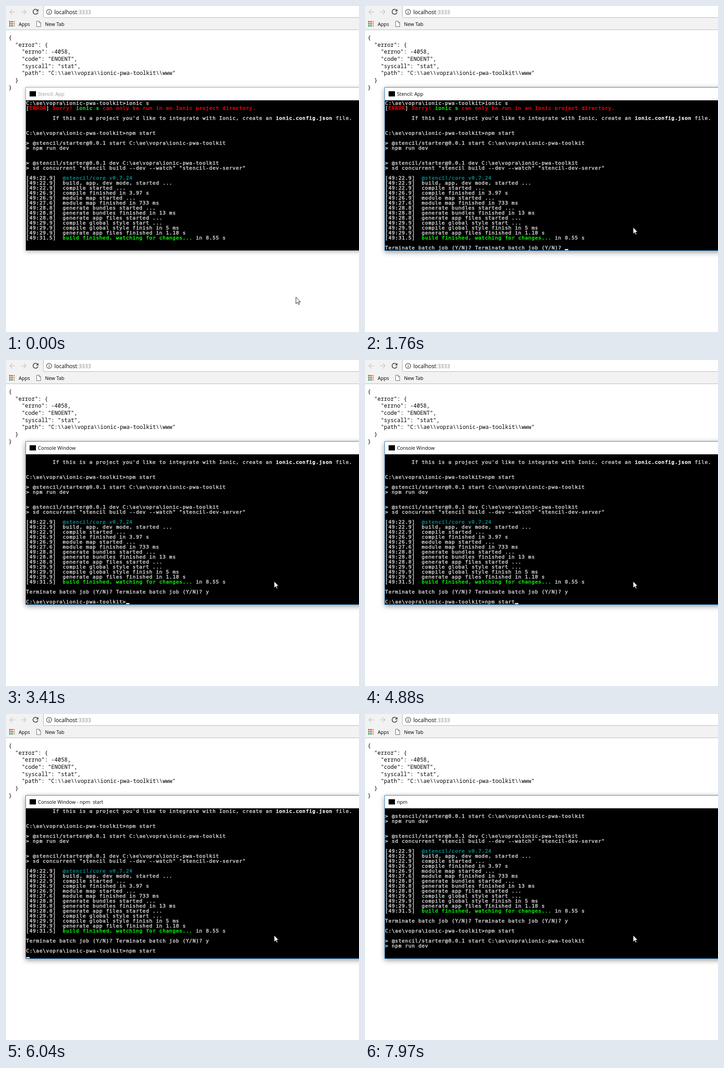
Write an HTML page that moves like this. It is 778 by 719 pixels and loops after 8 s.

```html
<!DOCTYPE html>
<html lang="en">
<head>
<meta charset="utf-8">
<title>Dev server restart</title>
<style>
  html, body { margin: 0; width: 100%; height: 100%; overflow: hidden; background: #fff; }
  svg { display: block; width: 778px; height: 719px; }
  text { white-space: pre; }
  .ui { font: 10.7px "Open Sans", sans-serif; }
  .url { font: 12px "Open Sans", sans-serif; }
  #json { font: 12px "Noto Sans Mono", monospace; letter-spacing: .015px; }
  #rows { font: 11px "DejaVu Sans Mono", monospace; letter-spacing: .715px; fill: #d0d0d0; stroke: #d0d0d0; stroke-width: .5px; }
  .red { fill: #f00; stroke: #f00; }
  .green { fill: #0f0; stroke: #0f0; }
  .teal { fill: #008888; stroke: #008888; }
  .white { fill: #fff; stroke: #fff; stroke-width: .7px; }
  #frame { fill: #fff; stroke: #aaa; filter: drop-shadow(0 2px 4px rgba(0, 0, 0, .3)); }
  #title { fill: #999; }
  .focus #frame { stroke: #2a88d0; filter: drop-shadow(0 3px 6px rgba(0, 0, 0, .42)); }
  .focus #title { fill: #000; }
</style>
</head>
<body>
<svg viewBox="0 0 778 719">
  <defs><clipPath id="screen"><rect x="44" y="209" width="734" height="330"/></clipPath></defs>

  <rect width="778" height="52" fill="#f2f2f2"/>
  <path d="M0 52.5H778" stroke="#b8b8b8"/>
  <path d="M790 -2H84.5Q82.5 -2 82.5 0V23.5Q82.5 25.5 84.5 25.5H790" fill="#fff" stroke="#b4b4b4"/>
  <g fill="none" stroke="#ccc" stroke-width="1.6">
    <path d="M20 13H8.500M14 7.500L8.500 13L14 18.500"/>
    <path d="M33 13H44.500M39 7.500L44.500 13L39 18.500"/>
    <path d="M69.500 9.200A5.500 5.500 0 1 0 70.500 14" stroke="#505050" stroke-width="1.8"/>
  </g>
  <path d="M71.500 6.500V12H66Z" fill="#505050"/>
  <circle cx="95" cy="13" r="5.600" fill="none" stroke="#555" stroke-width="1.300"/>
  <path d="M95 12V16.500M95 9.300V10.800" stroke="#555" stroke-width="1.500"/>
  <text class="url" x="106.500" y="17.500">localhost<tspan fill="#8a8a8a">:3333</tspan></text>
  <g id="apps"></g>
  <text class="ui" x="28" y="43.500">Apps</text>
  <path d="M67.500 33.500H73L76.500 37V45.500H67.500ZM73 33.500V37H76.500" fill="#fff" stroke="#666"/>
  <text class="ui" x="86" y="43.500">New Tab</text>
  <g id="json"></g>

  <g id="win">
    <rect id="frame" x="43.500" y="179.500" width="760" height="360"/>
    <rect x="52" y="188" width="14" height="11.500"/>
    <text id="title" class="ui" x="70.500" y="198"></text>
    <rect x="44" y="208" width="734" height="331"/>
    <g clip-path="url(#screen)">
      <g id="rows"></g>
      <rect id="caret" y="536" width="7.500" height="2.500" fill="#fff"/>
    </g>
  </g>
  <path id="mouse" d="M.5 .5V15.200L3.900 12L6.200 17L8.300 16L6.100 11.200H10.600Z" fill="#fff" stroke="#000" stroke-width=".9"/>
</svg>
<script>
const $ = id => document.getElementById(id);
const span = (cls, s) => `<tspan class="${cls}">${s}</tspan>`;
const COL = 22 / 3, ROW = 11;

$('apps').innerHTML = ['#e04a3f', '#e04a3f', '#f0a030', '#2f9e58', '#3f78d8', '#f0a030', '#2f9e58', '#3f78d8', '#e8b020']
  .map((c, i) => `<rect x="${7 + i % 3 * 4.600}" y="${33 + Math.floor(i / 3) * 4.600}" width="3.200" height="3.200" fill="${c}"/>`).join('');

$('json').innerHTML = String.raw`{
  "error": {
    "errno": -4058,
    "code": "ENOENT",
    "syscall": "stat",
    "path": "C:\\ae\\vopra\\ionic-pwa-toolkit\\www"
  }
}`.split('\n').map((s, i) => `<text x="5.800" y="${74 + i * 15.68}">${s}</text>`).join('');

const dir = String.raw`C:\ae\vopra\ionic-pwa-toolkit`;
const prompt = dir + '&gt;';
const script = name => `&gt; @stencil/starter@0.0.1 ${name} ${dir}`;
const log = (time, s) => `[49:${time}]  ${s}`;
const JOB = 29, CMD = 31;

const lines = [
  prompt + 'ionic s',
  `[${span('red', 'ERROR')}] ${span('red', 'Sorry! ')}${span('green', 'ionic s')}${span('red', ' can only be run in an Ionic project directory.')}`,
  '',
  `        If this is a project you'd like to integrate with Ionic, create an ${span('white', 'ionic.config.json')} file.`,
  '', '',
  prompt + 'npm start',
  '',
  script('start'),
  '&gt; npm run dev',
  '', '',
  script('dev'),
  '&gt; sd concurrent "stencil build --dev --watch" "stencil-dev-server"',
  '',
  log('22.9', span('teal', '@stencil/core v0.7.24')),
  log('22.9', 'build, app, dev mode, started ...'),
  log('22.9', 'compile started ...'),
  log('26.9', 'compile finished in 3.97 s'),
  log('26.9', 'module map started ...'),
  log('27.6', 'module map finished in 733 ms'),
  log('28.8', 'generate bundles started ...'),
  log('28.8', 'generate bundles finished in 13 ms'),
  log('28.8', 'generate app files started ...'),
  log('29.9', 'compile global style start ...'),
  log('29.9', 'compile global style finish in 5 ms'),
  log('29.9', 'generate app files finished in 1.18 s'),
  log('31.5', span('green', 'build finished, watching for changes...') + ' in 8.55 s'),
  '', '', '',
  prompt,
  '',
  script('start'),
  '&gt; npm run dev'
];
$('rows').innerHTML = lines.map((s, i) => `<text x="44.300" y="${218 + i * ROW}">${s}</text>`).join('');
const rowEls = $('rows').children;

const ask = 'Terminate batch job (Y/N)? '.repeat(2);
const shell = 'Console Window';

// Each cue changes only the listed parts of the state.
const cues = [
  [0, { title: 'Stencil: App', focus: false, scroll: 0, job: '', cmd: '', col: 0, caret: false, mouse: [638.5, 641.5] }],
  [70, { mouse: [626, 597] }],
  [140, { mouse: [600, 513] }],
  [210, { mouse: [590.5, 487.5] }],
  [590, { focus: true, caret: true }],
  [1140, { caret: false }],
  [1690, { caret: true }],
  [1760, { job: ask, col: 54 }],
  [2770, { caret: false }],
  [3230, { job: ask + 'y', col: 55 }],
  [3320, { caret: true }],
  [3410, { title: shell, scroll: 2, col: 30 }],
  [4250, { cmd: 'n', col: 31, caret: false }],
  [4330, { caret: true }],
  [4880, { cmd: 'npm start', col: 39 }],
  [5340, { caret: false }],
  [5870, { caret: true }],
  [6040, { title: shell + ' - npm  start', scroll: 3, col: 0 }],
  [6190, { title: 'npm' }],
  [6420, { caret: false }],
  [6970, { caret: true }],
  [7040, { scroll: 7 }],
  [7970, { caret: false }]
];

function draw(s) {
  $('title').textContent = s.title;
  $('win').setAttribute('class', s.focus ? 'focus' : '');
  $('rows').setAttribute('transform', `translate(0 ${-s.scroll * ROW})`);
  rowEls[JOB].textContent = s.job;
  rowEls[CMD].innerHTML = prompt + s.cmd;
  $('caret').setAttribute('x', 44.500 + s.col * COL);
  $('caret').setAttribute('visibility', s.caret ? 'visible' : 'hidden');
  $('mouse').setAttribute('transform', `translate(${s.mouse})`);
}

const start = performance.now();
let shown = -1;
function tick() {
  const t = (performance.now() - start) % 8000;
  const past = cues.filter(([at]) => at <= t);
  if (past.length !== shown) {
    shown = past.length;
    draw(Object.assign({}, ...past.map(([, change]) => change)));
  }
  requestAnimationFrame(tick);
}
tick();
</script>
</body>
</html>
```
